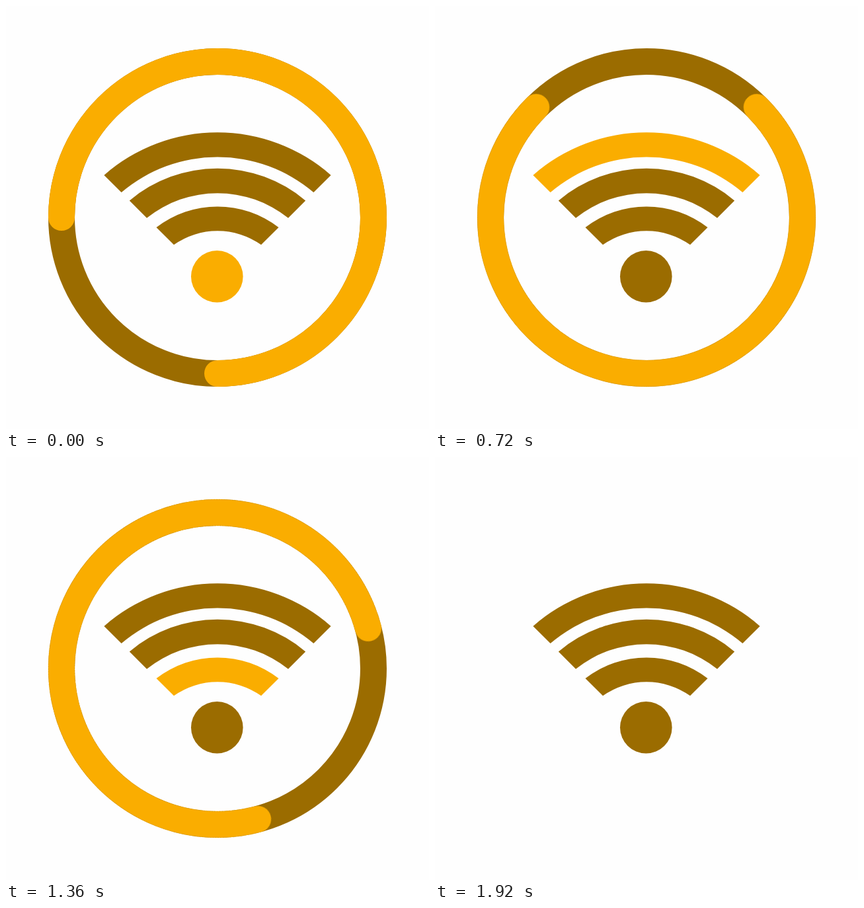
Animation of 640x640 px, one loop 1960 ms. Source, as an HTML page without scripts:

```html
<!DOCTYPE html>
<html lang="en">
<head>
<meta charset="utf-8">
<title>Wireless loader</title>
<style>
  :root { --dark: #9b6c00; --lit: #faad00; --loop: 1960ms; }
  html, body { margin: 0; width: 100%; height: 100%; overflow: hidden; background: #fefefe; }
  svg { display: block; width: 100%; height: 100%; }

  .ring { fill: none; stroke-width: 40; animation: blink var(--loop) step-end infinite; }
  .track { stroke: var(--dark); }
  .sweep {
    stroke: var(--lit);
    stroke-linecap: round;
    transform-origin: 320px 320px;
    animation: turn var(--loop) infinite;
  }

  /* Each part lights for 240 ms, twice per loop */
  .part { fill: var(--dark); animation: light var(--loop) step-end infinite; }
  .near { animation-delay: -1720ms; }
  .mid { animation-delay: -1480ms; }
  .far { animation-delay: -1240ms; }

  @keyframes turn {
    0% { transform: rotate(0deg); animation-timing-function: steps(48, end); }
    97.955%, 100% { transform: rotate(360deg); }
  }
  @keyframes blink {
    0% { visibility: visible; }
    97.955%, 100% { visibility: hidden; }
  }
  @keyframes light {
    0%, 48.976% { fill: var(--lit); }
    12.241%, 61.221%, 100% { fill: var(--dark); }
  }
</style>
</head>
<body>
<svg viewBox="0 0 640 640">
  <g class="ring">
    <circle class="track" cx="320" cy="320" r="236"/>
    <path class="sweep" d="M84 320A236 236 0 1 1 320 556"/>
  </g>
  <circle class="part" cx="319.3" cy="409.3" r="39.3"/>
  <path class="part near" d="M227.5 335A151.6 151.6 0 0 1 412.5 335L386 361.3A114.2 114.2 0 0 0 254 361.3Z"/>
  <path class="part mid" d="M186.8 294.4A206.6 206.6 0 0 1 453.2 294.4L427 320.7A171.4 171.4 0 0 0 213 320.7Z"/>
  <path class="part far" d="M148.4 255.9A260.2 260.2 0 0 1 491.6 255.9L465.4 282A224.6 224.6 0 0 0 174.6 282Z"/>
</svg>
</body>
</html>
```
